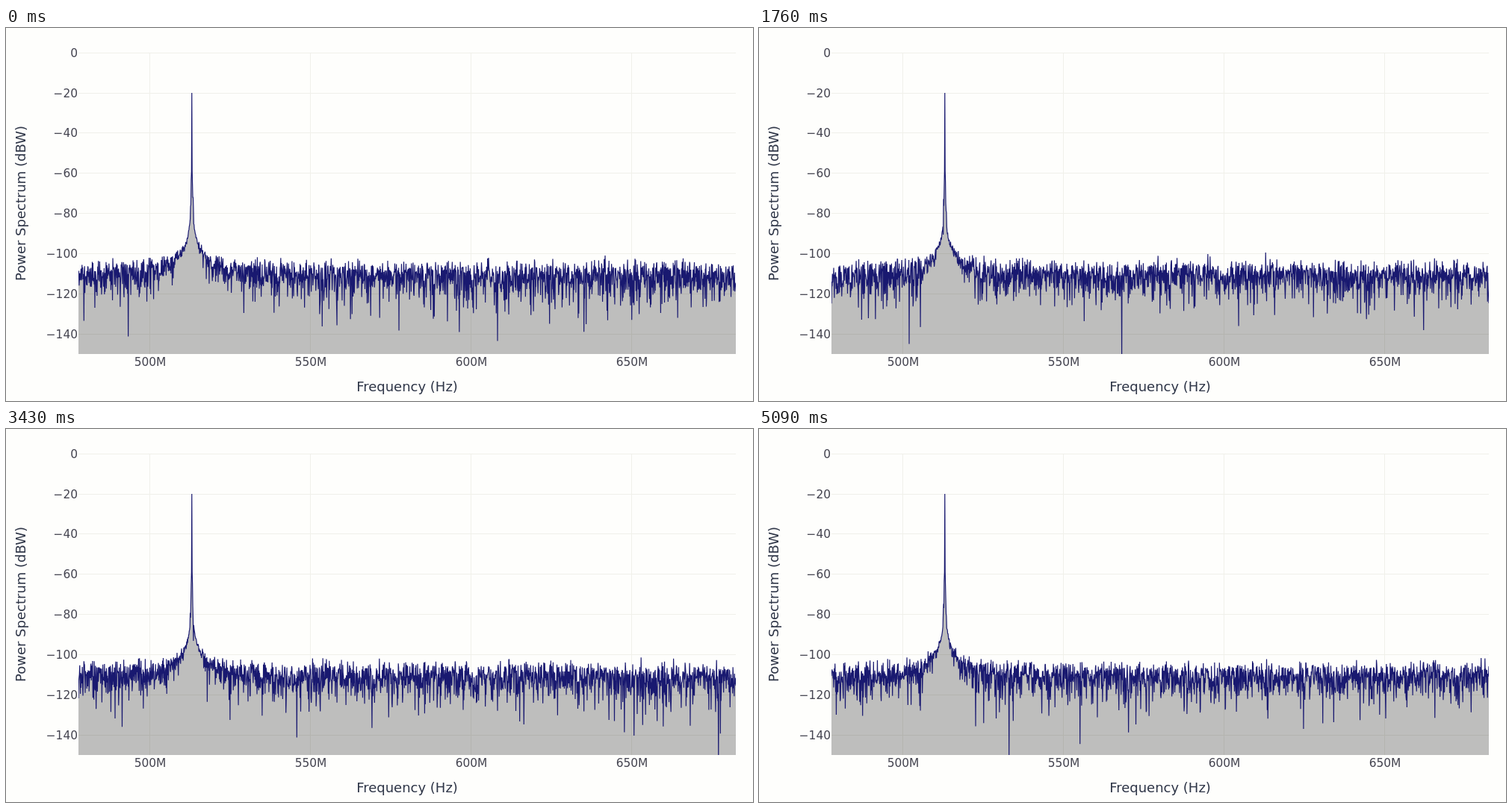
Write an HTML page with a canvas that moves like this. It is 1000 by 500 pixels and loops after 5190 ms.

```html
<!DOCTYPE html>
<html lang="en">
<head>
<meta charset="utf-8">
<title>Power spectrum</title>
<style>
  html, body { margin: 0; width: 100%; height: 100%; overflow: hidden; background: #fefefc; }
  svg, canvas { position: absolute; left: 0; top: 0; width: 1000px; height: 500px; }
  text { font-family: Verdana, "DejaVu Sans", sans-serif; font-size: 15.4px; fill: #444450; }
  .title { font-size: 18px; fill: #2f3648; text-anchor: middle; }
  .grid { stroke: #f0f0ea; stroke-width: 1; }
</style>
</head>
<body>
<svg id="axes" viewBox="0 0 1000 500">
  <text class="title" x="537" y="487">Frequency (Hz)</text>
  <text class="title" transform="translate(26 235) rotate(-90)">Power Spectrum (dBW)</text>
</svg>
<canvas id="plot" width="1000" height="500"></canvas>
<script>
const LOOP = 5190, STEPS = 53;
const LEFT = 97, RIGHT = 977, TOP = 33, BOTTOM = 437;
const BINS = 2048, PEAK = 353, NOISE = -110;

const axes = document.getElementById('axes');
const ctx = document.getElementById('plot').getContext('2d');
const yOf = db => TOP + 0.3 - db * 2.691;
const xOf = bin => LEFT + bin * (RIGHT - LEFT) / (BINS - 1);
const amp = db => 10 ** (db / 20);

function add(tag, attrs, label = '') {
  const el = document.createElementNS(axes.namespaceURI, tag);
  for (const key in attrs) el.setAttribute(key, attrs[key]);
  el.textContent = label;
  axes.append(el);
}

function drawAxes() {
  for (let db = 0; db >= -140; db -= 20) {
    const y = Math.floor(yOf(db)) + 0.5;
    add('line', { class: 'grid', x1: LEFT, x2: RIGHT, y1: y, y2: y });
    add('text', { x: 96, y: y + 5.5, 'text-anchor': 'end' }, db ? '\u2212' + -db : '0');
  }
  for (let i = 0; i < 4; i++) {
    const x = 192.5 + i * 215;
    add('line', { class: 'grid', x1: x, x2: x, y1: TOP, y2: BOTTOM });
    add('text', { x: x + 0.5, y: 453, 'text-anchor': 'middle' }, 500 + i * 50 + 'M');
  }
}

function seeded(seed) {
  return () => {
    seed = (seed + 0x6D2B79F5) | 0;
    let t = Math.imul(seed ^ (seed >>> 15), 1 | seed);
    t = (t + Math.imul(t ^ (t >>> 7), 61 | t)) ^ t;
    return ((t ^ (t >>> 14)) >>> 0) / 4294967296;
  };
}

// Level of the carrier leakage k bins away from the peak
function leakage(k, skirt, rand) {
  if (k === 0) return -20;
  if (k < 6) return -59 - (k - 1) * (4 + 5 * rand);
  return skirt - 20 * Math.log10(k);
}

// Carrier plus complex Gaussian noise, with one deep null per sweep
function spectrum(step) {
  const rand = seeded(step * 7919 + 17);
  const skirt = -72 + 4 * rand();
  const nullBin = Math.floor(rand() * BINS);
  const levels = Array.from({ length: BINS }, (_, bin) => {
    const r = amp(NOISE) * Math.sqrt(-Math.log(1 - rand()));
    const phase = rand() * 2 * Math.PI;
    const re = amp(leakage(Math.abs(bin - PEAK), skirt, rand())) + r * Math.cos(phase);
    return 20 * Math.log10(Math.hypot(re, r * Math.sin(phase)));
  });
  if (Math.abs(nullBin - PEAK) > 60) levels[nullBin] = -152;
  return levels;
}

function drawPlot(step) {
  const line = new Path2D();
  spectrum(step).forEach((db, bin) => line.lineTo(xOf(bin), yOf(db)));
  const area = new Path2D(line);
  area.lineTo(RIGHT, BOTTOM);
  area.lineTo(LEFT, BOTTOM);

  ctx.clearRect(0, 0, 1000, 500);
  ctx.save();
  ctx.beginPath();
  ctx.rect(LEFT, TOP, RIGHT - LEFT, BOTTOM - TOP);
  ctx.clip();
  ctx.fillStyle = 'rgba(0, 0, 0, 0.25)';
  ctx.fill(area);
  ctx.strokeStyle = '#191970';
  ctx.lineWidth = 1.2;
  ctx.miterLimit = 2;
  ctx.stroke(line);
  ctx.restore();
}

let shown = -1;
const start = performance.now();

function tick() {
  const t = (performance.now() - start) % LOOP;
  // Sweeps change on a 10 ms clock
  const step = Math.min(STEPS - 1, Math.floor((t + 5) * STEPS / LOOP));
  if (step !== shown) drawPlot(shown = step);
  requestAnimationFrame(tick);
}

drawAxes();
tick();
</script>
</body>
</html>
```
